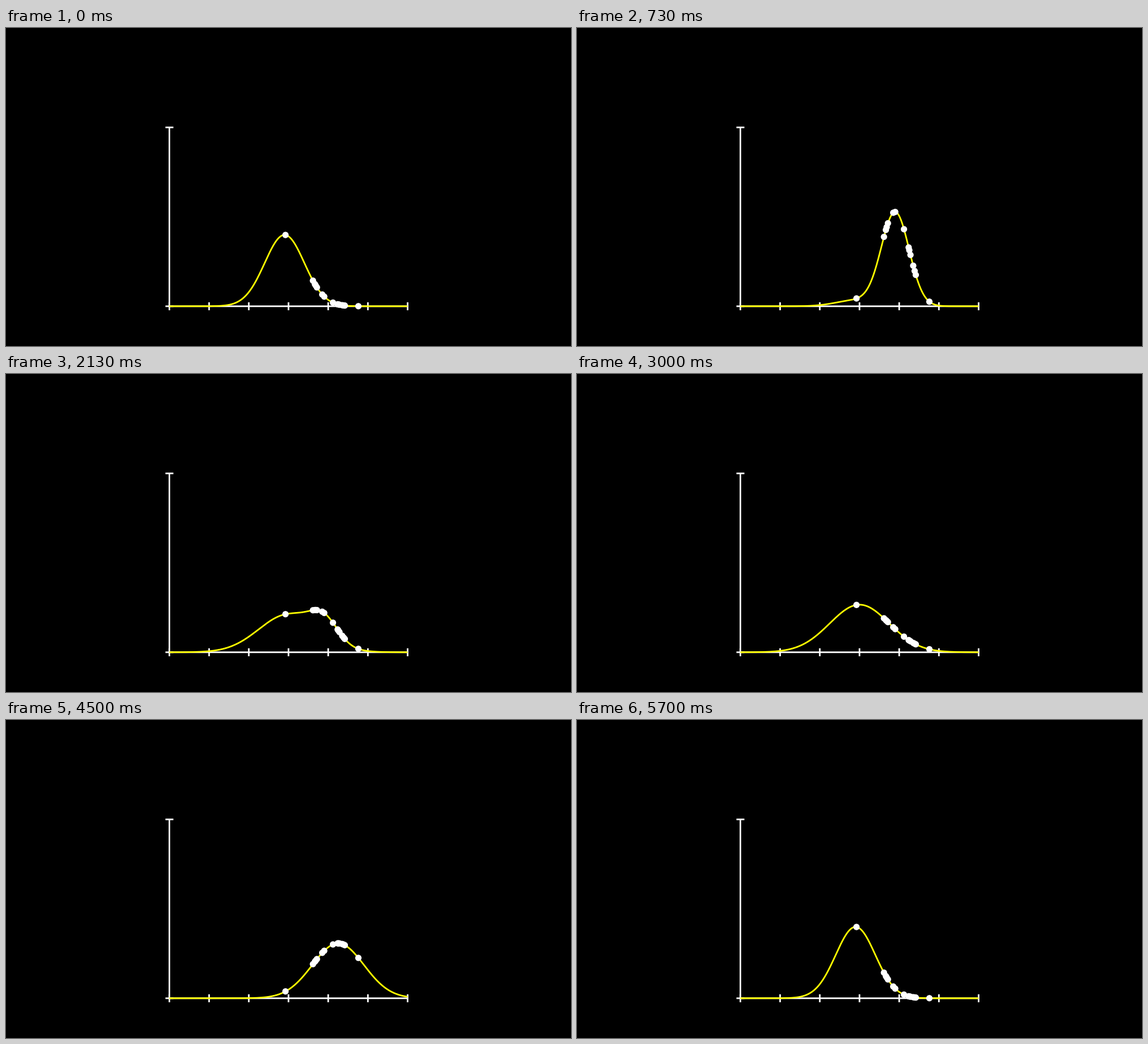
Animation, 998 px wide and 561 px high, one loop 6.01 s. Source, as a matplotlib script:

```python
import numpy as np
import matplotlib.pyplot as plt
from matplotlib.animation import FuncAnimation
from matplotlib.patches import Circle

W, H, DPI = 998, 561, 64
UNIT = H / 8                       # pixels per scene unit
STROKE = 0.04 * UNIT * 72 / DPI    # line weight in points
X0, Y0 = -3, -3                    # plot corner in scene units
Y_SCALE = 2.25                     # scene units per unit of density
TICK = 0.1

LOOP, TICK_MS = 6010, 10
FPS, MORPH, CYCLE = 30, 30, 45     # steps per morph and per morph plus pause

# mean and deviation of each bell curve
CURVES = [(2.9, 0.5), (3.9, 0.35), (3.0, 0.75), (4.25, 0.65)]
SAMPLES = np.array([2.924, 3.616, 3.664, 3.685, 3.716, 3.850, 3.900, 4.120,
                    4.238, 4.255, 4.284, 4.353, 4.389, 4.418, 4.760])
GRID = np.linspace(0, 6, 400)

plt.rcParams["path.snap"] = False


def pdf(x, mean, dev):
    return np.exp(-((x - mean) / dev) ** 2 / 2) / (dev * np.sqrt(2 * np.pi))


def sigmoid(x):
    return 1 / (1 + np.exp(-x))


def smooth(t, steep=10):
    edge = sigmoid(-steep / 2)
    return (sigmoid(steep * (t - 0.5)) - edge) / (1 - 2 * edge)


def height(x, cycle, p):
    a = CURVES[cycle % len(CURVES)]
    b = CURVES[(cycle + 1) % len(CURVES)]
    return Y0 + Y_SCALE * ((1 - p) * pdf(x, *a) + p * pdf(x, *b))


fig = plt.figure(figsize=(W / DPI, H / DPI), dpi=DPI, facecolor="black")
ax = fig.add_axes([0, 0, 1, 1])
ax.set_xlim(-W / UNIT / 2, W / UNIT / 2)
ax.set_ylim(-4, 4)
ax.axis("off")


def stroke(xs, ys, color="white", z=1):
    return ax.plot(xs, ys, color=color, lw=STROKE, zorder=z,
                   solid_capstyle="butt", solid_joinstyle="round")[0]


top = Y0 + 2 * Y_SCALE
stroke([X0, X0 + 6], [Y0, Y0])
stroke([X0, X0], [Y0, top])
for i in range(7):
    stroke([X0 + i, X0 + i], [Y0 - TICK, Y0 + TICK])
for y in (Y0, top):
    stroke([X0 - TICK, X0 + TICK], [y, y])

curve = stroke(X0 + GRID, height(GRID, 0, 0), "#ffff00", 2)
dots = [ax.add_patch(Circle((X0 + s, Y0), 0.08, fc="white", lw=0, zorder=3))
        for s in SAMPLES]


def update(n):
    # the 30 fps steps start on times rounded to 10 ms
    step = min(int((n * TICK_MS + 6) * FPS / 1000), 4 * CYCLE - 1)
    cycle, k = divmod(step, CYCLE)
    p = smooth(min(k / MORPH, 1))
    curve.set_ydata(height(GRID, cycle, p))
    for dot, s, y in zip(dots, SAMPLES, height(SAMPLES, cycle, p)):
        dot.center = X0 + s, y
    return [curve, *dots]


anim = FuncAnimation(fig, update, frames=LOOP // TICK_MS, interval=TICK_MS,
                     repeat=True, repeat_delay=0, blit=False)
plt.show()
```
